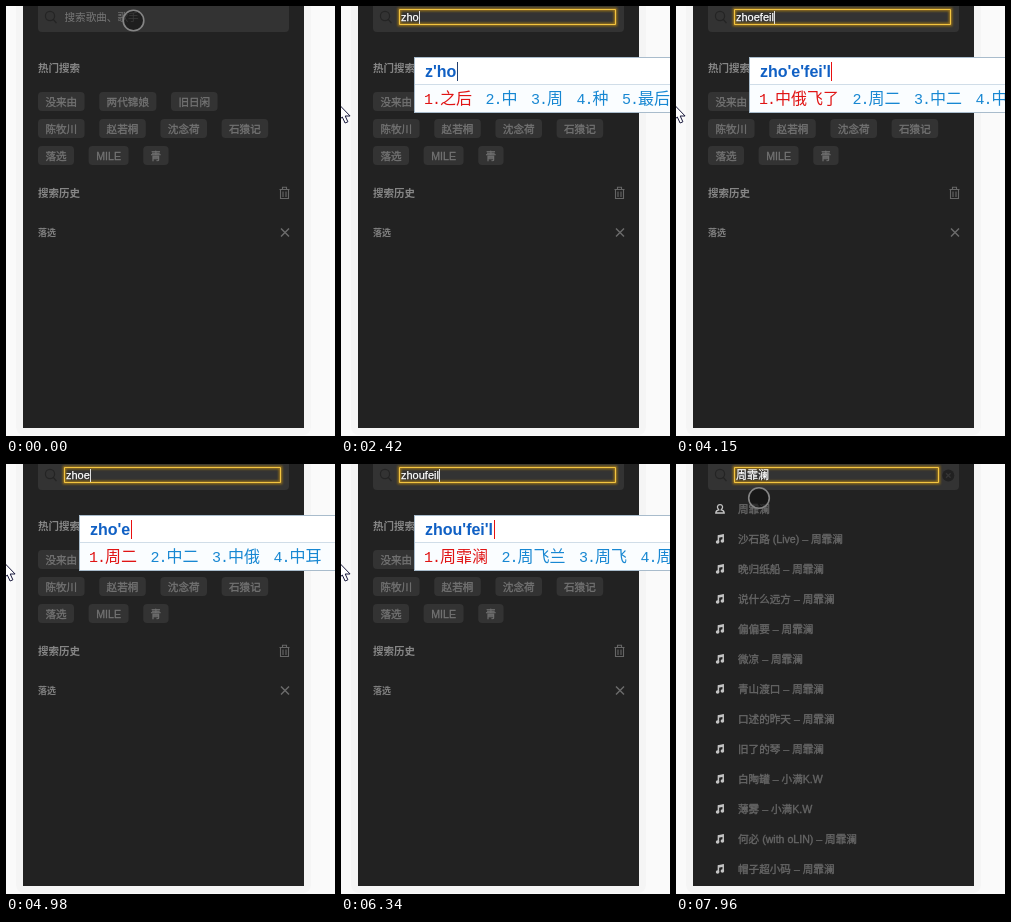
Recreate the animation shown at these times as an HTML page. Size 329 by 430 pixels, loop 8000 ms.

```html
<!DOCTYPE html>
<html lang="zh">
<head>
<meta charset="utf-8">
<title>Music search</title>
<style>
html, body { margin: 0; width: 100%; height: 100%; overflow: hidden; background: #fafafa; }
svg { display: block; width: 329px; height: 430px; }
text { font-family: "Liberation Sans", "Noto Sans CJK SC", "Noto Sans CJK", sans-serif; font-size: 10.6px; white-space: pre; }
.head { font-weight: bold; fill: #858585; font-size: 10.5px; }
.tag { fill: #737373; stroke: #737373; stroke-width: .3px; }
.row { fill: #666; stroke: #666; stroke-width: .35px; }
.typed { fill: #fff; stroke: #fff; stroke-width: .25px; font-size: 11px; }
.pre { font-weight: bold; font-size: 16px; fill: #1060c4; }
.cand { font-family: "Noto Sans CJK SC", "Noto Sans CJK", sans-serif; font-size: 16px; }
.num { font-family: "Liberation Mono", monospace; font-size: 15px; letter-spacing: -1px; }
</style>
</head>
<body>
<svg id="stage" viewBox="0 0 329 430" xmlns="http://www.w3.org/2000/svg">
  <defs>
    <filter id="glow" x="-5%" y="-60%" width="110%" height="220%"><feGaussianBlur stdDeviation="1.3"/></filter>
  </defs>
  <rect width="329" height="430" fill="#fafafa"/>
  <rect x="10" y="-20" width="295" height="449" rx="8" fill="#f5f5f5"/>
  <rect x="17" y="-5" width="281" height="427" fill="#222"/>

  <rect x="32" y="-10" width="251" height="36" rx="4" fill="#333"/>
  <g fill="none" stroke="#242424" stroke-width="1.2"><circle cx="44" cy="10" r="4.6"/><path d="M47.3 13.5 50.5 17"/></g>
  <g id="clear"><circle cx="272.3" cy="11.5" r="6" fill="#212121"/><path d="M270 9.2l4.6 4.6m0-4.6l-4.6 4.6" stroke="#353535" stroke-width="1.3"/></g>
  <g id="ring" fill="none">
    <rect class="r" x="58.5" y="3.5" height="15" stroke="#d89a10" stroke-width="3.4" opacity=".6" filter="url(#glow)"/>
    <rect class="r" x="58.5" y="3.5" height="15" rx=".5" stroke="#f3c540" stroke-width="1.1"/>
  </g>
  <text id="hint" x="58.5" y="15" fill="#777">搜索歌曲、歌手</text>
  <text id="typed" class="typed" x="60" y="15"></text>
  <rect id="under" x="60" y="16" height="1" fill="#ddd"/>
  <rect id="caret" y="5" width="1" height="13" fill="#ddd"/>

  <g id="home">
    <text class="head" x="32" y="66">热门搜索</text>
    <g id="tags"></g>
    <text class="head" x="32" y="191">搜索历史</text>
    <g fill="none" stroke="#666" stroke-width="1.1">
      <path d="M273.5 183.5h10M276.5 183v-1.8h4V183M274.5 184v8.5h8V184M277 185.5v5.5M280 185.5v5.5"/>
      <path d="M275 222.5l8 8m0-8l-8 8" stroke="#6c6c6c" stroke-width="1.4"/>
    </g>
    <text x="32" y="230" style="font-size:9px;font-weight:bold" fill="#808080">落选</text>
  </g>
  <g id="list"></g>

  <g id="ime">
    <rect x="73.5" y="51.5" width="270" height="55" fill="#fff" stroke="#a9bccc"/>
    <rect x="74" y="79" width="255" height="27" fill="#fafdff"/>
    <path d="M74 78.5h255" stroke="#d0dde8"/>
    <text id="pre" class="pre" x="84" y="71"></text>
    <rect id="bar" y="56" width="1" height="19"/>
    <g id="cands"></g>
  </g>

  <g id="touch"><circle r="10.3" fill="#111" fill-opacity=".6" stroke="#858585" stroke-width="1.6"/></g>
  <path id="arrow" d="M0 0V16.5L3.8 13 6.6 19 9.4 17.8 6.7 12H11.6Z" fill="#fff" stroke="#16163a" stroke-width="1"/>
</svg>
<script>
const NS = 'http://www.w3.org/2000/svg';
const $ = id => document.getElementById(id);
const show = (id, on) => { $(id).style.display = on ? '' : 'none'; };

function add(parent, name, attrs, text) {
  const el = document.createElementNS(NS, name);
  for (const k in attrs) el.setAttribute(k, attrs[k]);
  if (text) el.textContent = text;
  parent.appendChild(el);
  return el;
}

// Hot search tags
[['没来由', '两代锦娘', '旧日闲'], ['陈牧川', '赵若桐', '沈念荷', '石猿记'], ['落选', 'MILE', '青']]
  .forEach((row, i) => {
    let x = 32;
    const y = 86 + i * 27;
    for (const word of row) {
      const w = word === 'MILE' ? 40 : word.length * 10.6 + 14.8;
      add($('tags'), 'rect', { x, y, width: w, height: 19, rx: 4, fill: '#333' });
      add($('tags'), 'text', { x: x + w / 2, y: y + 13.5, class: 'tag', 'text-anchor': 'middle' }, word);
      x += w + 14.6;
    }
  });

// Search results
const SINGER = '周霏澜', BAND = '小满K.W';
const songs = ['沙石路 (Live)', '晚归纸船', '说什么远方', '偏偏要', '微凉', '青山渡口', '口述的昨天',
  '旧了的琴', '白陶罐', '薄雾', '何必 (with oLIN)', '帽子超小码'];
const rows = [SINGER, ...songs.map((s, i) => s + ' – ' + (i === 8 || i === 9 ? BAND : SINGER))];
rows.forEach((line, i) => {
  const y = 45 + i * 30;
  const g = add($('list'), 'g', { transform: `translate(44 ${y})` });
  if (i) {
    add(g, 'path', { d: 'M-1.6 3V-3.2L3.2 -4.2V2', fill: 'none', stroke: '#c4c4c4', 'stroke-width': 1.5 });
    add(g, 'path', { d: 'M-1.6 -2.2L3.2 -3.2', stroke: '#c4c4c4', 'stroke-width': 2 });
    add(g, 'circle', { cx: -2.4, cy: 3, r: 1.8, fill: '#c4c4c4' });
    add(g, 'circle', { cx: 2.4, cy: 2, r: 1.8, fill: '#c4c4c4' });
  } else {
    add(g, 'path', {
      d: 'M-1.3 .8C-3.6 -1.5 -2.6 -4.3 0 -4.3S3.6 -1.5 1.3 .8C3.4 1.3 4.2 2 4.2 4H-4.2C-4.2 2 -3.4 1.3 -1.3 .8Z',
      fill: 'none', stroke: '#c4c4c4', 'stroke-width': 1.3
    });
  }
  add($('list'), 'text', { x: 62, y: y + 4, class: 'row' }, line);
});

// Candidate words for each composed string
const words = {
  "z": '在 这 再 走 最',
  "zh": '这 中 周 种 只',
  "z'ho": '之后 中 周 种 最后',
  "zho'e": '周二 中二 中俄 中耳',
  "zho'e'f": '周二放 周二 中二 中俄',
  "zho'e'fe": '中俄飞 周二 中二 中俄',
  "zho'e'fei": '中俄飞 周二 中二 中俄',
  "zho'e'fei'l": '中俄飞了 周二 中二 中俄',
  "zhou": '周 洲 州 粥 轴',
  "zhou'f": '周福 周芳 周风 周发',
  "zhou'fe": '周飞 周峰 周菲 周',
  "zhou'fei": '周飞 周霏 周菲 周',
  "zhou'fei'l": '周霏澜 周飞兰 周飞 周末'
};

// Typing steps: start, text in the field, composed string, underline
const steps = [
  [0, '', ''], [2000, '', 'z'], [2150, 'z', 'zh', 1], [2270, 'zh', "z'ho"], [2420, 'zho', "z'ho"],
  [3410, 'zho', "zho'e", 1], [3540, 'zhoe', "zho'e'f"], [3690, 'zhoef', "zho'e'fe", 1],
  [3840, 'zhoef', "zho'e'fei"], [4000, 'zhoefeil', "zho'e'fei'l", 1], [4150, 'zhoefeil', "zho'e'fei'l"],
  [4430, 'zhoefeil', "zho'e'fei"], [4580, 'zhoefei', "zho'e'fe"], [4710, 'zhoefe', "zho'e'f"],
  [4860, 'zhoef', "zho'e"], [4980, 'zhoe', "zho'e"], [5130, 'zho', "z'ho", 1], [5280, 'zho', "z'ho"],
  [5680, 'zho', 'zhou'], [5800, 'zhou', 'zhou'], [5920, 'zhouf', "zhou'f"], [6070, 'zhoufe', "zhou'fe"],
  [6220, 'zhoufei', "zhou'fei", 1], [6340, 'zhoufeil', "zhou'fei'l"], [6500, SINGER, '']
];

// Pointer steps: start, kind, x, y
const pointer = [
  [0, 'touch', 127.5, 14.5], [1610, 'touch', 58, 62], [1730, 'arrow', -4, 97], [1880, 'arrow', -2.5, 99],
  [2000, 'arrow', -2.5, 98], [7410, 'touch', 38, 105], [7560, 'touch', 102, 62], [7680, 'touch', 99, 50],
  [7830, 'touch', 66, 41], [7960, 'touch', 83, 34]
];

// Times at which the field caret switches on or off
const blinks = [1150, 1610, 2150, 2830, 3410, 4430, 4580, 5680, 5800, 6770, 7010, 7560, 7680, 7830];

const at = (list, t) => list.filter(s => s[0] <= t).pop();

function drawCandidates(key) {
  const box = $('cands');
  box.textContent = '';
  let x = 83;
  (words[key] || '').split(' ').forEach((word, i) => {
    const fill = i ? '#1787d2' : '#e01414';
    add(box, 'text', { x, y: 98, class: 'num', fill }, i + 1 + '.');
    add(box, 'text', { x: x + 16, y: 98, class: 'cand', fill }, word);
    x += 16 + word.length * 16 + 13.5;
  });
}

let last;
function draw(t) {
  const step = at(steps, t);
  const [, field, comp, line] = step;
  if (step !== last) {
    last = step;
    $('typed').textContent = field;
    $('pre').textContent = comp;
    drawCandidates(comp);
    show('ime', comp);
    if (comp) $('bar').setAttribute('x', Math.round(84.5 + $('pre').getComputedTextLength()));
    const w = field ? $('typed').getComputedTextLength() : 0;
    $('caret').setAttribute('x', Math.round(60 + w));
    $('under').setAttribute('width', w);
    show('under', line);
    show('hint', !field);
  }
  $('bar').setAttribute('fill', t < 3410 ? '#23406e' : '#e81010');

  const done = t >= 6500;
  show('ring', t >= 1150);
  document.querySelectorAll('.r').forEach(r => r.setAttribute('width', done ? 204 : 216));
  show('clear', done);
  show('caret', blinks.filter(b => b <= t).length % 2);
  show('home', t < 6770);
  show('list', t >= 6890);

  const [, kind, x, y] = at(pointer, t);
  for (const id of ['touch', 'arrow']) show(id, id === kind);
  $(kind).setAttribute('transform', `translate(${x} ${y})`);
}

const start = performance.now();
function tick(now) {
  draw(Math.max(0, now - start) % 8000);
  requestAnimationFrame(tick);
}
draw(0);
requestAnimationFrame(tick);
</script>
</body>
</html>
```
